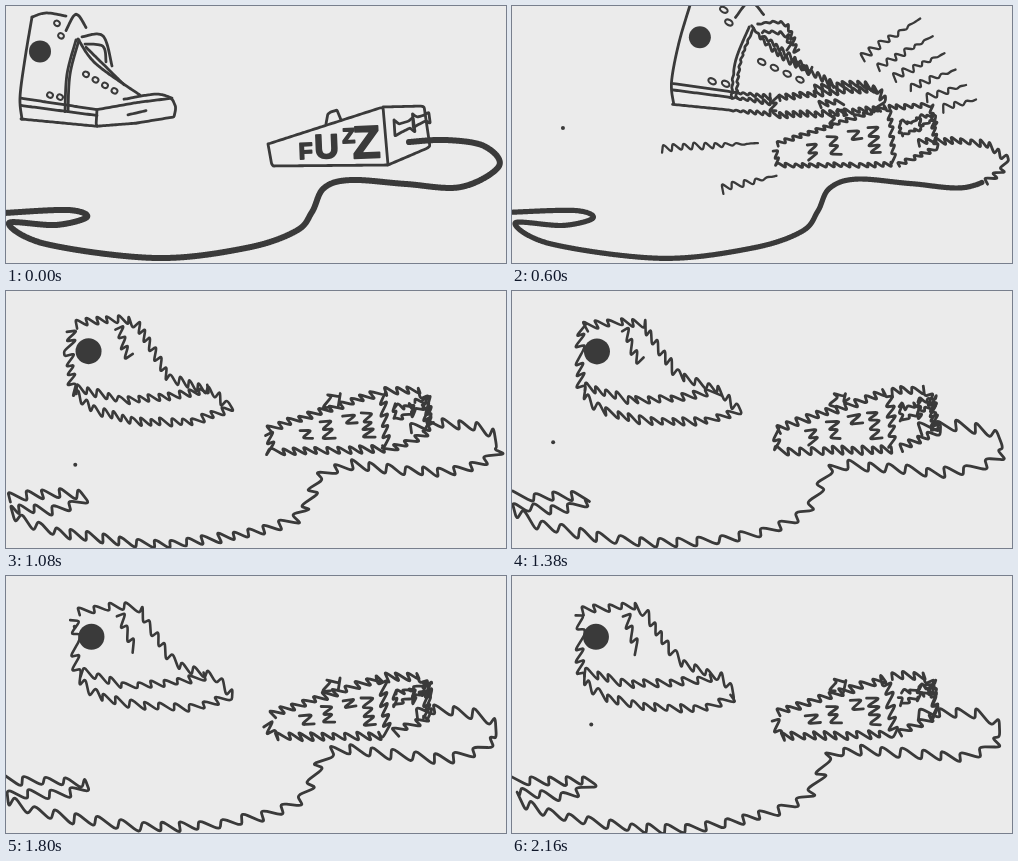
Write an HTML page with a canvas that moves like this. It is 500 by 257 pixels and loops after 2.22 s.

```html
<!DOCTYPE html>
<html lang="en">
<head>
<meta charset="utf-8">
<title>Fuzz pedal</title>
<style>
html, body { margin: 0; width: 100%; height: 100%; overflow: hidden; background: #ebebeb; }
canvas { display: block; }
</style>
</head>
<body>
<canvas id="stage" width="500" height="257"></canvas>
<script>
const ctx = document.getElementById('stage').getContext('2d');
const PAPER = '#ebebeb', INK = '#3a3a3a';
const STEP = 60, COUNT = 37;
const FUZZ_ON = 9, LIFT = 13;

let seed = 1;
function rnd() {
  seed = (seed + 0x6D2B79F5) | 0;
  let t = Math.imul(seed ^ (seed >>> 15), 1 | seed);
  t = (t + Math.imul(t ^ (t >>> 7), 61 | t)) ^ t;
  return ((t ^ (t >>> 14)) >>> 0) / 4294967296;
}
const jit = a => (rnd() * 2 - 1) * a;
const clamp = (v, a, b) => Math.max(a, Math.min(b, v));
const mix = (a, b, u) => a + (b - a) * u;
const between = (p, q, u) => [mix(p[0], q[0], u), mix(p[1], q[1], u)];
const dist = (p, q) => Math.hypot(q[0] - p[0], q[1] - p[1]);
const shaken = (p, a) => p.map(([x, y]) => [x + jit(a), y + jit(a)]);

// "x,y x,y" string to points
const path = s => s.split(' ').map(p => p.split(',').map(Number));

// Dense points along a polyline or a Catmull-Rom curve
function trace(p, smooth) {
  const out = [];
  for (let i = 0; i < p.length - 1; i++) {
    const a = p[Math.max(i - 1, 0)], b = p[i], c = p[i + 1], d = p[Math.min(i + 2, p.length - 1)];
    const n = Math.max(2, Math.ceil(dist(b, c) / 1.2));
    const curve = (q, u) => b[q] + u * (c[q] - a[q]) / 2
      + u * u * (2 * a[q] - 5 * b[q] + 4 * c[q] - d[q]) / 2
      + u * u * u * (3 * b[q] - a[q] - 3 * c[q] + d[q]) / 2;
    for (let j = 0; j < n; j++) {
      const u = j / n;
      out.push(smooth ? [curve(0, u), curve(1, u)] : between(b, c, u));
    }
  }
  out.push(p[p.length - 1]);
  return out;
}

// Stroke with slightly rounded corners
function ink(pts, width) {
  if (pts.length < 2) return;
  const last = pts.length - 1;
  ctx.lineWidth = width;
  ctx.beginPath();
  ctx.moveTo(...pts[0]);
  for (let i = 1; i < last; i++) {
    ctx.lineTo(...between(pts[i - 1], pts[i], 0.72));
    ctx.quadraticCurveTo(...pts[i], ...between(pts[i], pts[i + 1], 0.28));
  }
  ctx.lineTo(...pts[last]);
  ctx.stroke();
}

// Leaning zigzag along dense points; amp is a function of (point, share of length)
function zigzag(pts, width, amp, wave, lean) {
  const out = [], last = pts.length - 1;
  let run = 0, next = 0, sign = 1;
  for (let i = 0; i < last; i++) {
    const p = pts[i], len = dist(p, pts[i + 1]);
    if (run >= next && len) {
      const a = amp(p, i / last);
      if (a < 0.6) {
        out.push(p);
        next = run + 3;
      } else {
        const flip = pts[i + 1][0] < p[0] ? -1 : 1;
        const tx = (pts[i + 1][0] - p[0]) / len * flip, ty = (pts[i + 1][1] - p[1]) / len * flip;
        const d = a * sign * mix(0.8, 1.25, rnd());
        out.push([p[0] + d * (tx * lean - ty), p[1] + d * (ty * lean + tx)]);
        sign = -sign;
        next = run + wave / 2 * mix(0.8, 1.2, rnd());
      }
    }
    run += len;
  }
  if (amp(pts[last], 1) < 0.6) out.push(pts[last]);
  ink(out, width);
}

function dot(p, r) {
  ctx.beginPath();
  ctx.arc(...p, r, 0, 7);
  ctx.fill();
}

const CABLE = path('403,136 440,134 478,140 493,160 455,181 400,178 345,174 318,182 306,206 290,225 240,242 150,252 40,238 3,217 50,219 81,211 62,204 -2,207');

const TOE = path('91,104 90,120 130,117 168,111 170,102 166,93 132,97 91,104');
const UPPER = [
  '26,15 19,55 14,92 16,113',
  '26,15 40,11 60,14',
  '60,28 70,12 80,25',
  '118,94 150,89 166,93',
  '72,36 90,60 134,90',
  '76,34 97,33 106,62',
  '79,41 97,43 100,58',
  '80,44 118,80',
  '122,109 140,105'
].map(path);
const SEAM = path('59,106 61,70 70,37');

const SCRAWL = [
  '68,34 110,29 130,31 165,85 210,101 226,118 188,132 130,130 90,120 68,100 66,60 68,34',
  '113,35 117,52 128,74',
  '70,95 118,109 160,106 208,99'
].map(path);

const CASE = path('262,138 377,101 382,159 266,160 262,138');
const SIDE = path('377,101 418,100 424,141 382,159');
const SWITCH = path('320,118 322,107 331,104 335,114');
const KNOB = path('-10,-6 -5,-2 5,-5 9,-9 11,6 6,2 -4,7 -9,10 -10,-6');

// letter, x, baseline, font size
const LETTERS = [['F', 300, 153, 23], ['U', 321, 152, 34], ['Z', 343, 137, 21], ['Z', 361, 152, 46]];

// step, heel x, heel y, widening, turn
const STOMP = [[0, 15, 113, 1, 0], [5, 61, 45, 1.36, 0.07], [8, 160, 98, 1.36, 0.03], [11, 160, 98, 1.36, 0.03], [13, 75, 76, 1.1, 0.2]];

function stompPose(k) {
  let i = 0;
  while (i < STOMP.length - 2 && k > STOMP[i + 1][0]) i++;
  const a = STOMP[i], b = STOMP[i + 1];
  return a.map((v, j) => mix(v, b[j], (k - a[0]) / (b[0] - a[0])));
}

// Map around a pivot: scale, turn, then move
function placer(px, py, x, y, sx, sy, turn) {
  const c = Math.cos(turn), s = Math.sin(turn);
  return p => {
    const u = (p[0] - px) * sx, v = (p[1] - py) * sy;
    return [x + u * c - v * s, y + u * s + v * c];
  };
}

function cleanShoe(k) {
  const [, hx, hy, wide, turn] = stompPose(k);
  const place = placer(15, 113, hx, hy, wide, 1.04, turn);
  const reach = (k - FUZZ_ON) * 115;
  const amp = p => k < FUZZ_ON ? 0 : clamp((reach - dist(p, [325, 90])) / 15, 0, 3.6);
  const line = (p, smooth) =>
    zigzag(trace(shaken(p.map(place), k ? 0.7 : 0), smooth), 2.8, amp, 6, 0.7);

  UPPER.forEach(p => line(p, true));
  line(TOE, false);
  for (const y of [0, 7, 20]) line([[15, 93 + y], [91, 104 + y * 0.8]]);
  for (const x of [0, 3]) line(SEAM.map(p => [p[0] + x, p[1]]), true);

  const eyelet = (x, y) => {
    ctx.lineWidth = 2;
    ctx.beginPath();
    ctx.ellipse(...place([x, y]), 3 * wide, 2.6, 0.5, 0, 7);
    ctx.stroke();
  };
  for (let i = 0; i < 4; i++) eyelet(80 + 9.5 * i, 70 + 5.3 * i);
  for (let i = 0; i < 2; i++) {
    eyelet(51 + 4 * i, 21 + 12 * i);
    eyelet(44 + 10 * i, 90 + 2 * i);
  }
  dot(place([34, 48]), 11);
}

function wildShoe(k) {
  const e = clamp((17 - k) / 4, 0, 1);
  const size = 1 + 0.12 * e;
  const place = placer(226, 118, 226 + 8 * e + jit(1.5), 118 + 3 * e + jit(1.5),
    size, size * (1 + 0.45 * e), 0.22 * e);
  const wave = 9 + rnd() * 4, a = 4.5 + rnd(), lean = 0.6 + rnd() * 0.4;
  for (const p of SCRAWL) zigzag(trace(shaken(p.map(place), 1.5)), 2.6, () => a, wave, lean);
  dot(place([84, 60]), 13);
}

function drawPedal(k) {
  const wild = k >= FUZZ_ON;
  const grow = clamp((k - FUZZ_ON) / 10, 0, 1);
  const a = wild ? mix(2.4, 4.8, grow) : 0;
  const wave = mix(6, 9, grow) + rnd() * 2;
  const lean = 0.6 + rnd() * 0.4;
  const shake = wild ? 1.5 : k ? 0.7 : 0;
  const line = (p, part) =>
    zigzag(trace(shaken(p, shake)), 2.8, () => a * part, wave * Math.sqrt(part), lean);

  line(CASE, 1);
  line(SIDE, 1);
  line(SWITCH, 0.7);
  for (const [x, y, s] of [[398, 120, 1], [415, 113, 0.85]])
    line(KNOB.map(p => [x + p[0] * s, y + p[1] * s]), 0.5);

  ctx.textAlign = 'center';
  ctx.lineWidth = 1.6;
  for (const [ch, x, y, size] of LETTERS) {
    if (wild) {
      const tall = size * 0.7;
      zigzag(trace([[x, y - tall], [x + 2, y]]), 2.8, () => 6, 6 + rnd() * 2, 0.3);
      continue;
    }
    ctx.save();
    ctx.translate(x + jit(shake), y + jit(shake));
    ctx.rotate(-0.04);
    ctx.font = `900 ${size}px "Liberation Sans", Arial, sans-serif`;
    ctx.fillText(ch, 0, 0);
    ctx.strokeText(ch, 0, 0);
    ctx.restore();
  }
  if (k >= LIFT) line([[420, 108], [424, 142]], 0.8);
}

function drawCable(k) {
  const grow = clamp((k - FUZZ_ON) / 10, 0, 1);
  const pts = trace(shaken(CABLE, k ? mix(1, 2.5, grow) : 0), true);
  const front = (k - 9.35) * 200;
  let cut = 0, run = 0;
  while (cut < pts.length - 1 && run < front) run += dist(pts[cut], pts[++cut]);
  if (cut) zigzag(pts.slice(0, cut + 1), 2.8, () => mix(3.6, 6, grow), mix(6, 18, grow) + jit(1.5), 0.8);
  if (cut < pts.length - 1) ink(pts.slice(cut), k < FUZZ_ON ? 6 : 5.2);
}

function soundLine(x, y, len, angle) {
  const end = [x + len * Math.cos(angle), y + len * Math.sin(angle)];
  zigzag(trace([[x, y], end]), 2.3, (p, u) => clamp((0.95 - u) * 8, 0, 4.5), 9, 0.4);
}

function drawNoise() {
  for (let i = 0; i < 6; i++) soundLine(348 + 16 * i, 52 + 10 * i, 72 - 7 * i, -0.58 + 0.07 * i);
  for (let i = 0; i < 2; i++) soundLine(148 + 60 * i, 142 + 41 * i, 98 - 40 * i, -0.05 - 0.18 * i);
}

function draw(k) {
  seed = 811 + k * 7919;
  ctx.fillStyle = PAPER;
  ctx.fillRect(0, 0, 500, 257);
  ctx.fillStyle = ctx.strokeStyle = INK;
  ctx.lineCap = ctx.lineJoin = 'round';
  drawPedal(k);
  drawCable(k);
  if (k < LIFT) cleanShoe(k); else wildShoe(k);
  if (k >= FUZZ_ON && k < 12) drawNoise();
  if (k && rnd() < 0.5) dot([rnd() * 90, 40 + rnd() * 145], 2);
}

let last = -1;
function tick() {
  const k = Math.floor(performance.now() / STEP) % COUNT;
  if (k !== last) draw(last = k);
  requestAnimationFrame(tick);
}
tick();
</script>
</body>
</html>
```
